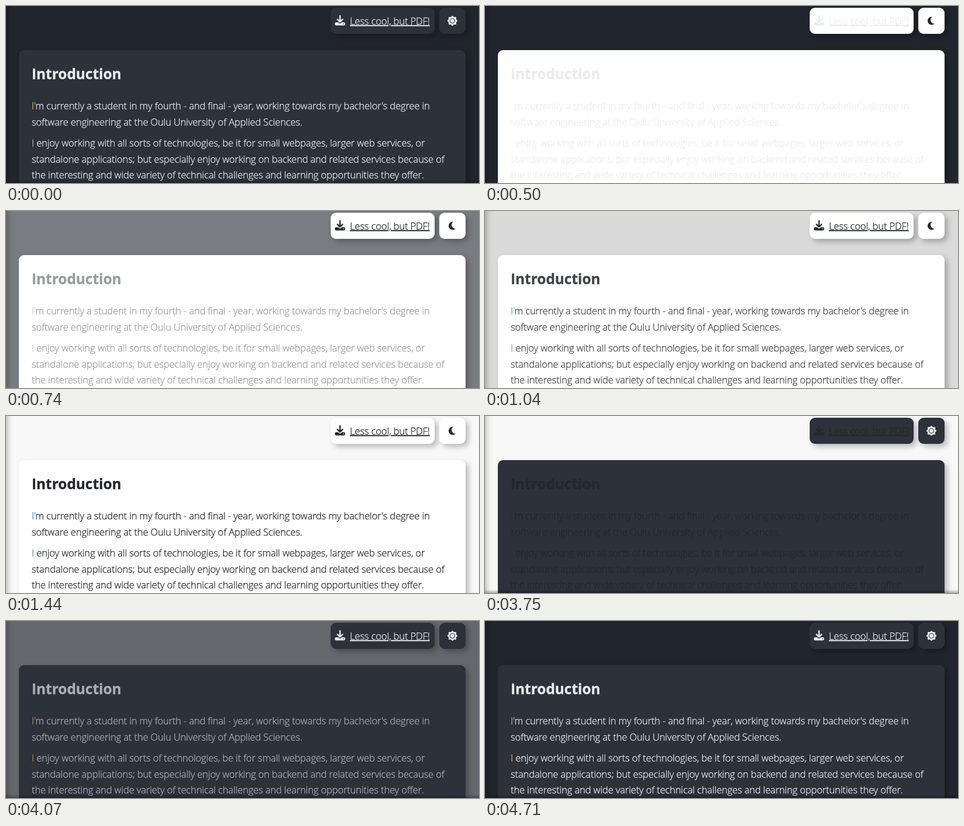
An HTML page that plays this animation: 810 px wide and 305 px high, repeating every 5.61 s.

```html
<!DOCTYPE html>
<html lang="en">
<head>
<meta charset="utf-8">
<title>Theme switch</title>
<style>
  html, body { margin: 0; width: 100%; height: 100%; overflow: hidden; }
  svg { display: block; width: 810px; height: 305px; background: var(--page); }
  text {
    font: 300 16.5px "Open Sans", "Noto Sans", sans-serif; letter-spacing: -.12px; white-space: pre;
    fill: var(--text); stroke: var(--text); stroke-width: .3px;
  }
  .title { font-weight: 700; font-size: 24.4px; letter-spacing: 0; }
  .accent { fill: var(--accent); stroke: var(--accent); }
  .link {
    fill: var(--link); stroke: var(--link);
    text-decoration: underline 1px; text-underline-offset: 2px;
  }
  .card { fill: var(--card); filter: drop-shadow(5px 5px 5px rgba(0, 0, 0, .25)); }
  .icon { fill: var(--link); }
  .line { fill: none; stroke: var(--link); stroke-width: 2.2; stroke-linecap: round; stroke-linejoin: round; }
  #sun { fill: #e9ecef; stroke: #e9ecef; stroke-linejoin: round; }
  #sun circle { fill: none; stroke: var(--card); stroke-width: 1.1; }
  #moon { fill: #24272e; }
</style>
</head>
<body>
<svg id="stage" viewBox="0 0 810 305">
  <defs>
    <linearGradient id="fade" x2="0" y2="1">
      <stop stop-opacity="0"/>
      <stop offset="1" stop-opacity=".3"/>
    </linearGradient>
  </defs>

  <rect class="card" x="-60" y="-40" width="58" height="400"/>
  <rect class="card" x="556" y="3" width="178" height="45" rx="9"/>
  <rect class="card" x="742" y="3" width="45" height="45" rx="9"/>
  <rect class="card" x="22" y="76" width="765" height="300" rx="9"/>

  <g transform="translate(563.2 15.8) scale(1.1)">
    <path class="line" d="M8 1.1V10.4M4 6.6l4 4 4-4"/>
    <path class="icon" d="M2 11H5.2L6.6 12.4a2 2 0 0 0 2.8 0L10.8 11H14a2 2 0 0 1 2 2v1a2 2 0 0 1-2 2H2a2 2 0 0 1-2-2v-1a2 2 0 0 1 2-2z"/>
    <circle cx="13.5" cy="13.5" r=".75" fill="var(--card)"/>
  </g>
  <text class="link" x="589" y="32">Less cool, but PDF!</text>

  <g id="sun" transform="translate(764.5 25.5)"><polygon/><circle r="4"/></g>
  <path id="moon" d="M766 18.6A7 7 0 1 0 769.9 30.5A6.5 6.5 0 0 1 766 18.6z"/>

  <text class="title" x="44" y="126">Introduction</text>
  <text x="44" y="178"><tspan class="accent">I'</tspan>m currently a student in my fourth - and final - year, working towards my bachelor's degree in</text>
  <text x="44" y="206">software engineering at the Oulu University of Applied Sciences.</text>
  <text x="44" y="242"><tspan class="accent">I</tspan> enjoy working with all sorts of technologies, be it for small webpages, larger web services, or</text>
  <text x="44" y="270">standalone applications; but especially enjoy working on backend and related services because of</text>
  <text x="44" y="297">the interesting and wide variety of technical challenges and learning opportunities they offer.</text>

  <rect id="edge" y="299" width="810" height="6" fill="url(#fade)"/>
</svg>
<script>
const LOOP = 5610, TO_LIGHT = 500, TO_DARK = 3750;
const dark = { page: [33, 37, 44], card: [44, 49, 58], text: [233, 236, 239], accent: [238, 180, 92] };
const light = { page: [248, 248, 248], card: [255, 255, 255], text: [36, 39, 46], accent: [52, 134, 222] };

const $ = id => document.getElementById(id);
const stage = $('stage');
const mix = (a, b, p) => a.map((v, i) => v + (b[i] - v) * p);
const paint = (name, rgb) => stage.style.setProperty('--' + name, `rgb(${rgb.map(Math.round)})`);

// cubic-bezier(.25, .1, .25, 1), solved by bisection
function ease(x) {
  if (x >= 1) return 1;
  const curve = (a, b, s) => 3 * a * s * (1 - s) ** 2 + 3 * b * s * s * (1 - s) + s ** 3;
  let lo = 0, hi = 1;
  for (let i = 0; i < 20; i++) {
    const mid = (lo + hi) / 2;
    if (curve(.25, .25, mid) < x) lo = mid; else hi = mid;
  }
  return curve(.1, 1, lo);
}

function draw(t) {
  const isLight = t >= TO_LIGHT && t < TO_DARK;
  const [from, to] = isLight ? [dark, light] : [light, dark];
  const since = isLight ? t - TO_LIGHT : (t - TO_DARK + LOOP) % LOOP;
  const p = ease(since / (isLight ? 960 : 800));

  paint('page', mix(from.page, to.page, p));
  paint('text', mix(from.text, to.text, p));
  paint('link', mix(from.text, to.text, ease(since / 200)));
  paint('accent', mix(to.card, to.accent, p));
  paint('card', to.card);
  $('sun').style.display = $('edge').style.display = isLight ? 'none' : '';
  $('moon').style.display = isLight ? '' : 'none';
}

const star = Array.from({ length: 16 }, (_, i) => {
  const r = i % 2 ? 6.4 : 8.6, a = i * Math.PI / 8;
  return [r * Math.cos(a), r * Math.sin(a)];
});
document.querySelector('#sun polygon').setAttribute('points', star.join(' '));

const start = performance.now();
function tick() {
  draw((performance.now() - start) % LOOP);
  requestAnimationFrame(tick);
}
tick();
</script>
</body>
</html>
```
